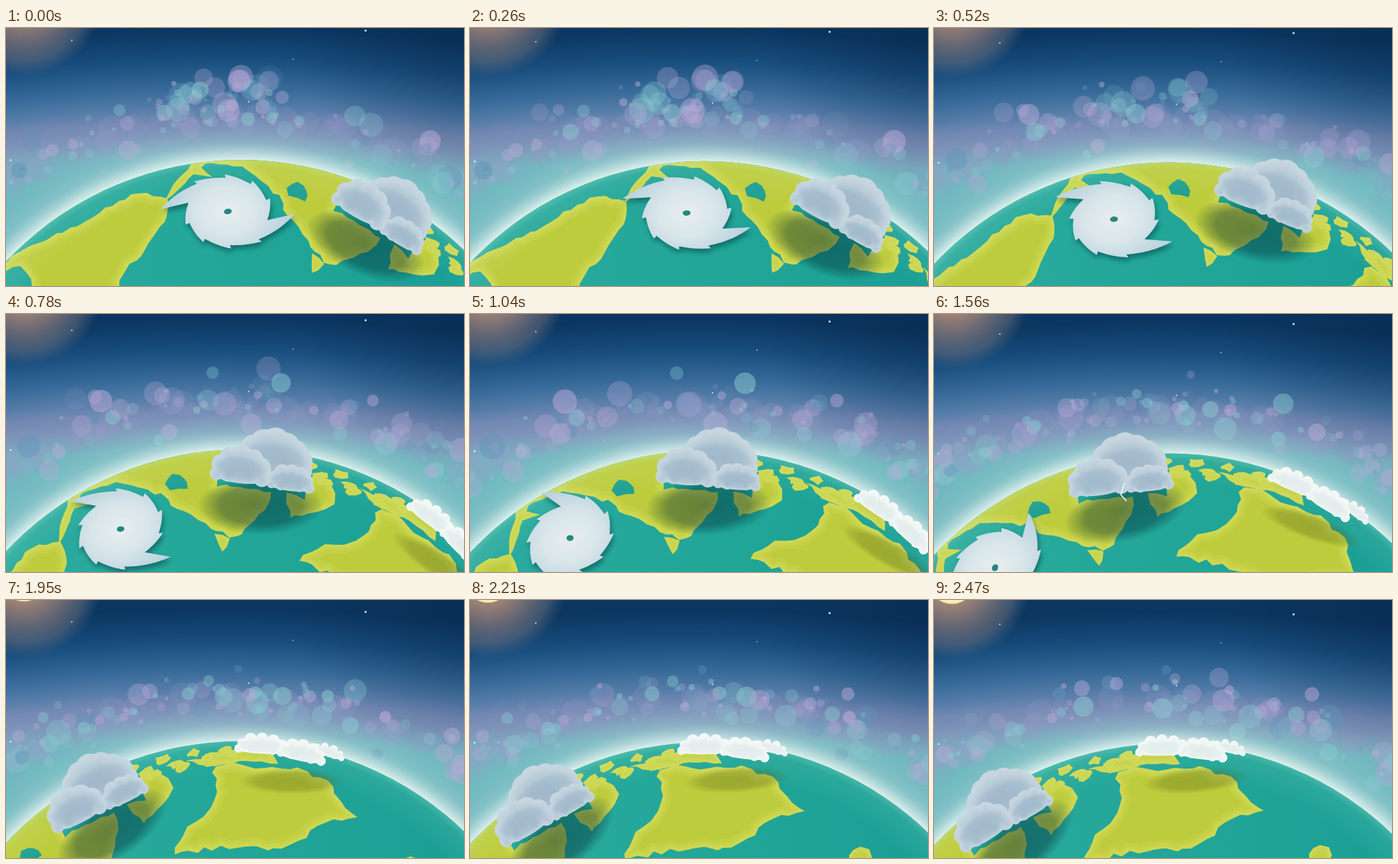
An HTML page with a canvas that plays this animation: 640 by 360 pixels, repeating every 2.6 s.

```html
<!DOCTYPE html>
<html lang="en">
<head>
<meta charset="utf-8">
<title>Turning planet</title>
<style>
html, body { margin: 0; width: 100%; height: 100%; overflow: hidden; background: #0b355e; }
canvas { display: block; width: 640px; height: 360px; }
</style>
</head>
<body>
<canvas id="stage" width="640" height="360"></canvas>
<script>
const c = document.getElementById('stage').getContext('2d');
const TAU = Math.PI * 2, RAD = Math.PI / 180;
const CX = 328, CY = 634, R = 450, STEP = 130, STEPS = 20, SINK = .865;

let turn, drop;

const ease = (s, a, b) => {
  const t = Math.min(1, Math.max(0, (s - a) / (b - a)));
  return t * t * (3 - 2 * t);
};

// slow drift with two swings, from one sight to the next, in degrees
const angleAt = s => .55 * s + 22.7 * ease(s, 2.35, 6.92) + 28.45 * ease(s, 9.75, 16.25);

function randomizer(seed) {
  return () => {
    seed = (seed * 1664525 + 1013904223) >>> 0;
    return seed / 4294967296;
  };
}

function disc(x, y, r, fill) {
  c.beginPath();
  c.arc(x, y, r, 0, TAU);
  c.fillStyle = fill;
  c.fill();
}

function radial(x, y, r0, r1, stops) {
  const g = c.createRadialGradient(x, y, r0, x, y, r1);
  stops.forEach(([at, color]) => g.addColorStop(at, color));
  return g;
}

function softEllipse(x, y, rx, ry, rgb, alpha) {
  c.save();
  c.translate(x, y);
  c.scale(rx, ry);
  disc(0, 0, 1, radial(0, 0, 0, 1, [[0, `rgba(${rgb},${alpha})`],
    [.65, `rgba(${rgb},${alpha * .85})`], [1, `rgba(${rgb},0)`]]));
  c.restore();
}

// Draw in stage coordinates as they are at step s.
function atStep(s, draw) {
  c.save();
  c.translate(CX, CY + drop);
  c.rotate((angleAt(s) - turn) * RAD);
  c.translate(-CX, -CY - SINK * s);
  draw();
  c.restore();
}

// Closed outline through key points, its edges broken into a ragged coast.
function coast(rough, pts) {
  const p = new Path2D(), rnd = randomizer(pts[0] + 7 * pts[1] + 900);
  for (let i = 0; i < pts.length; i += 2) {
    const [x, y] = [pts[i], pts[i + 1]];
    const dx = pts[(i + 2) % pts.length] - x, dy = pts[(i + 3) % pts.length] - y;
    const len = Math.hypot(dx, dy), n = Math.max(1, Math.round(len / 11));
    p.lineTo(x, y);
    for (let k = 1; k < n; k++) {
      const t = (k + rnd() * .6 - .3) / n, off = (rnd() - .5) * 2 * rough / len;
      p.lineTo(x + dx * t - dy * off, y + dy * t + dx * off);
    }
  }
  p.closePath();
  return p;
}

function blob(x, y, rx, ry, tilt, seed) {
  const p = new Path2D(), rnd = randomizer(seed), n = 9;
  for (let i = 0; i < n; i++) {
    const a = i / n * TAU, k = .55 + .6 * rnd();
    const u = Math.cos(a) * rx * k, v = Math.sin(a) * ry * k;
    p.lineTo(x + u * Math.cos(tilt) - v * Math.sin(tilt), y + u * Math.sin(tilt) + v * Math.cos(tilt));
  }
  p.closePath();
  return p;
}

const west = coast(3, [-30,345, 20,312, 120,265, 175,232, 197,230, 226,238, 222,270, 195,308, 165,342,
  152,372, 60,420, 35,350, 20,332]);
const isthmus = coast(2, [262,180, 284,182, 273,195, 288,208, 262,204, 250,217, 222,241, 240,211, 254,198]);
const main = coast(4, [45,285, 140,200, 330,180, 320,200, 262,238, 262,248, 338,250, 332,275, 302,312,
  285,318, 240,297, 200,280, 185,264, 130,255, 80,270]);
const islet = coast(3, [264,314, 286,319, 277,338]);
const lake = blob(207, 246, 19, 14, 0, 5);
const east = coast(3, [169,285, 196,280, 186,243, 212,236, 234,262, 219,285, 205,300, 193,312]);
const northland = coast(5, [288,241, 305,230, 398,236, 450,252, 491,303, 443,312, 420,332, 385,347,
  300,343, 236,355, 248,328, 282,295, 295,268]);
const longIsle = coast(2, [215,236, 242,231, 240,225, 300,210, 331,212, 344,229, 290,230, 246,241]);
const isles = Array.from({ length: 11 }, (_, i) => {
  const rnd = randomizer(60 + i * 977);
  const a = (-25.5 + i * 1.9 + rnd()) * RAD, r = 437 - (i % 3) * 9 + 3 * rnd();
  return blob(CX + r * Math.sin(a), CY + 16.4 - r * Math.cos(a), 9 + 7 * rnd(), 6, a - .2, i + 3);
});
isles.push(blob(541, 358, 18, 15, .5, 8));

function land(...shapes) {
  for (const p of shapes) {
    c.save();
    c.fillStyle = '#bdcc3d';
    c.fill(p);
    c.clip(p);
    c.lineJoin = 'round';
    for (const w of [24, 14, 7]) {
      c.strokeStyle = 'rgba(232,230,120,.14)';
      c.lineWidth = w;
      c.stroke(p);
    }
    c.restore();
  }
}

function sky() {
  c.fillStyle = radial(310, 2600 + drop, 2400, 2600, [
    [0, '#6fbabf'], [.1, '#74b5bf'], [.17, '#7da5bd'], [.26, '#7e93b9'], [.35, '#7489b3'],
    [.45, '#557ca8'], [.58, '#376a98'], [.78, '#184d7d'], [1, '#0b3660']]);
  c.fillRect(0, 0, 640, 360);
  c.fillStyle = radial(640, -20, 0, 240, [[0, 'rgba(8,38,74,.45)'], [1, 'rgba(8,38,74,0)']]);
  c.fillRect(400, 0, 240, 220);

  const y = drop - 44;
  disc(25, y, 112, radial(25, y, 25, 112, [[0, 'rgba(205,155,125,.85)'], [.35, 'rgba(165,135,125,.7)'],
    [.75, 'rgba(115,115,125,.48)'], [1, 'rgba(90,105,130,0)']]));
  disc(25, y, 33, radial(25, y, 24, 33, [[0, '#fffbd0'], [1, '#f0e99c']]));

  for (const [x, sy, r] of [[502.5,3.5,1.5], [92,17.5,1], [6.5,184.5,1.3], [401,43.5,.8], [339,103,1]])
    disc(x, sy + drop, r, 'rgba(235,245,255,.9)');
}

const LILAC = '187,170,214', AQUA = '139,202,208', BLUE = '96,146,184';
const arcY = x => 121 + (x - 320) ** 2 * .0009;

// A belt of bubbles that fade in and out; a crowd over the middle comes first.
const rnd = randomizer(41);
const bubbles = Array.from({ length: 430 }, () => {
  const born = 23 * rnd() ** 1.2 - 5, crowd = born < 2 && rnd() < .45;
  const x = crowd ? 200 + 190 * rnd() : 670 * rnd() - 15;
  const y = arcY(x) + (rnd() + rnd() + rnd() - 1.5) * 36 - (crowd ? 16 : 0);
  const pick = rnd();
  return { x, y, r: 3 + 15 * rnd() ** 2, born, life: 4 + 5 * rnd(), alpha: .22 + .3 * rnd(),
    tint: pick < .52 ? LILAC : pick < .88 ? AQUA : BLUE };
});

function belt(s) {
  const haze = randomizer(9);
  for (let i = 0; i < 50; i++) {
    const x = haze() * 660 - 10;
    disc(x, arcY(x) + haze() * 26 - 8 + drop, 9 + haze() * 11, 'rgba(150,156,196,.16)');
  }
  for (const p of bubbles) {
    const t = (s - p.born) / p.life;
    if (t <= 0 || t >= 1) continue;
    const fade = Math.min(1, 2 * Math.sin(Math.PI * t));
    disc(p.x, p.y + drop - t * 4, p.r * (.8 + t * .3), `rgba(${p.tint},${p.alpha * fade})`);
  }
}

function globe() {
  const y = CY + drop;
  disc(CX, y, R + 62, radial(CX, y, R - 2, R + 62, [[0, 'rgba(246,252,246,.88)'],
    [.16, 'rgba(222,238,236,.66)'], [.42, 'rgba(168,208,213,.34)'], [1, 'rgba(125,180,198,0)']]));
  c.save();
  c.beginPath();
  c.arc(CX, y, R, 0, TAU);
  c.clip();
  const sea = c.createLinearGradient(0, 0, 640, 0);
  sea.addColorStop(0, '#2cab9f');
  sea.addColorStop(.6, '#20a597');
  sea.addColorStop(1, '#1b9f96');
  c.fillStyle = sea;
  c.fillRect(0, 0, 640, 360);

  atStep(0, () => land(west, isthmus));
  atStep(10, () => {
    land(main, islet);
    c.fillStyle = '#20a093';
    c.fill(lake);
  });
  atStep(15, () => {
    land(east, northland);
    softEllipse(400, 253, 75, 18, '85,100,20', .34);
  });
  atStep(19, () => land(longIsle, ...isles));
  atStep(6, () => softEllipse(356, 267, 88, 41, '0,44,52', .48));

  disc(CX, y, R, radial(CX, y, R - 45, R, [[0, 'rgba(225,250,225,0)'],
    [.8, 'rgba(225,250,225,.08)'], [1, 'rgba(190,245,225,.25)']]));
  c.restore();
}

// Two hooked arms, each with small teeth along its back.
const swirl = new Path2D();
for (let i = 0; i < 240; i++) {
  const u = i % 120 / 120, tooth = 1 - u * 5 % 1;
  const reach = 30 * Math.exp(-7 * u) + 6 * tooth * tooth;
  const a = i / 240 * TAU + .3 - reach * .007;
  swirl.lineTo((57 + reach) * Math.cos(a), (57 + reach) * Math.sin(a));
}
swirl.closePath();

function hurricane(s) {
  atStep(0, () => {
    c.translate(310, 256);
    c.scale(1, .8);
    c.rotate((6 * s + .55 * s * s) * RAD);
    c.save();
    c.shadowColor = 'rgba(0,65,70,.55)';
    c.shadowBlur = 7;
    c.shadowOffsetX = 2;
    c.shadowOffsetY = 5;
    c.fillStyle = radial(0, 0, 4, 85, [[0, '#e6edee'], [.45, '#d9e6ea'], [.8, '#c4d9e2'], [1, '#bdd3df']]);
    c.fill(swirl);
    c.restore();
    c.rotate(-.4);
    c.scale(1, .85);
    disc(0, 0, 5.5, '#28877f');
  });
}

// A heap of puffs on a flat base: a row along the top, a smaller one inside.
function heap(x, y, w, h, tilt, edge, core) {
  const puffs = [], rnd = randomizer(x * 31 + y);
  const n = Math.round(w / 9) + 3;
  for (const k of [.8, .4]) for (let i = 0; i < n; i++) {
    const a = Math.PI * i / (n - 1), r = h * (.24 + .16 * Math.sin(a) + .1 * rnd());
    puffs.push([-Math.cos(a) * w * k, -Math.sin(a) * h * k, r]);
  }
  c.save();
  c.translate(x, y);
  c.rotate(tilt);
  c.beginPath();
  c.ellipse(0, 0, w * .85, h * .8, 0, Math.PI, TAU);
  c.ellipse(0, 0, w * .95, h * .28, 0, 0, Math.PI);
  c.fillStyle = `rgb(${edge})`;
  c.fill();
  for (const [px, py, r] of puffs) disc(px, py, r, `rgb(${edge})`);
  softEllipse(0, -h * .25, w * .9, h * .55, core, .75);
  for (const [px, py, r] of puffs)
    disc(px, py, r, radial(px, py + r * .2, 0, r * .95, [[0, `rgba(${core},.5)`], [1, `rgba(${core},0)`]]));
  c.restore();
}

function stormCloud(s) {
  atStep(6, () => {
    const tones = ['198,214,224', '158,183,201'];
    heap(372, 214, 52, 44, .12, ...tones);
    heap(326, 226, 40, 36, .12, ...tones);
    heap(397, 240, 33, 25, .12, ...tones);
  });
  if (s === 12) {
    c.beginPath();
    c.moveTo(266, 236);
    c.lineTo(261, 252);
    c.lineTo(269, 261);
    c.strokeStyle = '#f4fbff';
    c.lineWidth = 1.5;
    c.stroke();
  }
}

function whiteClouds() {
  const tones = ['244,249,246', '224,235,235'];
  atStep(15, () => {
    heap(449, 215, 26, 12, .3, ...tones);
    heap(357, 209, 40, 20, .06, ...tones);
    heap(412, 219, 36, 20, .2, ...tones);
  });
}

function frame() {
  const s = Math.floor(performance.now() % (STEP * STEPS) / STEP);
  turn = angleAt(s);
  drop = SINK * s;
  sky();
  belt(s);
  globe();
  hurricane(s);
  whiteClouds();
  stormCloud(s);
  requestAnimationFrame(frame);
}
frame();
</script>
</body>
</html>
```
